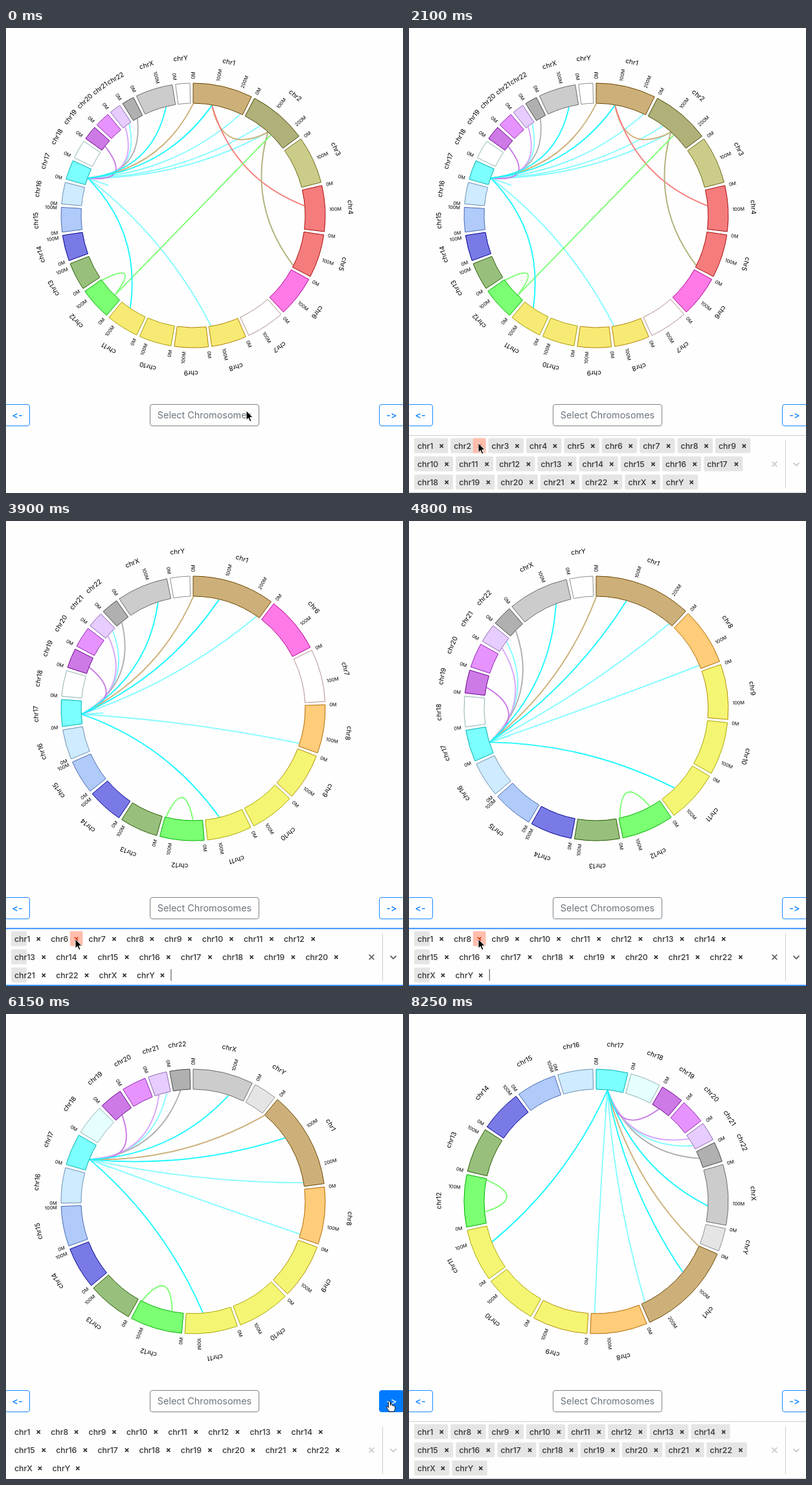
Animation of 613x717 px, one loop 8.7 s. Source, as an HTML page:

```html
<!DOCTYPE html>
<html lang="en">
<head>
<meta charset="utf-8">
<title>Chromosome ring</title>
<style>
  html, body { margin: 0; width: 100%; height: 100%; overflow: hidden; background: #fefefe; }
  svg {
    display: block; width: 613px; height: 717px;
    font-family: Inter, sans-serif;
    font-variant-ligatures: none; font-feature-settings: "calt" 0, "liga" 0;
  }
</style>
</head>
<body>
<svg id="stage" viewBox="0 0 613 717" width="613" height="717"></svg>
<script>
const LOOP = 8700, STEP = 150;
const CX = 289, CY = 289, OUTER = 204, INNER = 173, CHORD = 172.3, GAP = 0.025, BEND = 0.62;

// name: length in Mb, base colour, fill
const CHR = {
  1: [249.25, '996600', 'cdb079'], 2: [243.2, '666600', 'b0b079'],
  3: [198.02, '99991e', 'cccc8a'], 4: [191.15, 'ee1111', 'f57c7c'],
  5: [180.92, 'ee1111', 'f57c7c'], 6: [171.12, 'ff00cc', 'ff7ae6'],
  7: [159.14, 'ffcccc', 'ffffff'], 8: [146.36, 'ff9900', 'ffcc7a'],
  9: [141.21, 'ffcc00', 'f5f574'], 10: [135.53, 'f0f000', 'f5f574'],
  11: [135.01, 'f0f000', 'f5f574'], 12: [133.85, '00ff00', '7bff73'],
  13: [115.17, '358000', '98c07c'], 14: [107.35, '0000cc', '7a7ae6'],
  15: [102.53, '6699ff', 'b0caf9'], 16: [90.35, '99ccff', 'ceebff'],
  17: [81.2, '00ffff', '7bffff'], 18: [78.08, 'ccffff', 'e5ffff'],
  19: [59.13, '9900cc', 'cd7ae6'], 20: [63.03, 'cc33ff', 'e693ff'],
  21: [48.13, 'cc99ff', 'e6ccff'], 22: [51.3, '666666', 'b0b0b0'],
  X: [155.27, '999999', 'cccccc'], Y: [59.37, 'cccccc', 'e5e5e5']
};
const NAMES = [...Array(22).keys()].map(i => String(i + 1)).concat('X', 'Y');

const CYAN = '#1cf9ff', PALE = '#84fcff';
const LINKS = [
  [17, 34, 17, 34, PALE], [17, 34, 1, 238, PALE], [17, 34, 2, 87, PALE],
  [17, 34, 2, 136, PALE], [17, 34, 8, 136, PALE], [17, 34, 21, 36, PALE],
  [17, 34, 22, 22, '#b0b0b0'], [17, 34, 21, 12, '#d6a6fb'], [17, 34, 19, 24, '#c87ae6'],
  [17, 34, 1, 0.5, '#cdb079'], [1, 92, 2, 136, '#cdb079'], [1, 92, 4, 77, '#f57c7c'],
  [2, 136, 5, 171, '#b0b079'], [2, 156, 12, 34, '#7bff73'], [12, 34, 12, 130, '#7bff73'],
  [17, 34, 1, 92, CYAN], [17, 34, 'X', 108, CYAN], [17, 34, 11, 85, CYAN]
];

const REMOVALS = [2550, 2850, 3450, 3900, 4350, 4650];
const TURNS = [6000, 6150, 6450, 6750, 6900, 7050, 7350, 7650];
const OPEN = 1200, FOCUS = 2400, BLUR = 5850, LEAVE = 8100;

const within = (t, a, b) => t >= a && t < b;
const countUntil = (list, t) => list.filter(x => x <= t).length;
const num = v => +v.toFixed(2);
const polar = (a, r) => [CX + r * Math.sin(a), CY - r * Math.cos(a)];
const pt = (a, r) => polar(a, r).map(num).join(' ');
const hexParts = hex => [0, 2, 4].map(i => parseInt(hex.substr(i, 2), 16));
const darker = hex => `rgb(${hexParts(hex).map(v => Math.round(v * 0.7))})`;

function mix(a, b, k) {
  const p = hexParts(a), q = hexParts(b);
  return `rgb(${p.map((v, i) => Math.round(v + (q[i] - v) * k))})`;
}

function rect(x, y, w, h, attrs) {
  return `<rect x="${num(x)}" y="${y}" width="${num(w)}" height="${h}" ${attrs}/>`;
}

function cross(x, y, r, color, width) {
  return `<path d="M${num(x - r)} ${y - r}l${2 * r} ${2 * r}m0 ${-2 * r}l${-2 * r} ${2 * r}"
    stroke="${color}" stroke-width="${width}" fill="none"/>`;
}

// Lighter chromosomes pick up their tint later in the loop.
function look(name, t) {
  let [, base, fill] = CHR[name];
  if (t < 3450 && +name >= 8 && +name <= 11) {
    fill = 'f7ea74';
    base = +name > 9 ? 'f0e000' : 'ffbb00';
  }
  if (t < 6000 && (name === '18' || name === 'Y')) fill = 'ffffff';
  return { fill: '#' + fill, line: darker(base) };
}

function layout(names) {
  const total = names.reduce((s, n) => s + CHR[n][0], 0);
  const scale = (2 * Math.PI - GAP * names.length) / total;
  const start = {};
  let a = 0;
  for (const n of names) {
    start[n] = a;
    a += CHR[n][0] * scale + GAP;
  }
  return { start, at: (n, mb) => start[n] + mb * scale };
}

function block(name, lay, t) {
  const a = lay.start[name], len = CHR[name][0], b = lay.at(name, len);
  const { fill, line } = look(name, t);
  const deg = v => num(v * 180 / Math.PI);
  let out = `<path d="M${pt(a, OUTER)}A${OUTER} ${OUTER} 0 0 1 ${pt(b, OUTER)}L${pt(b, INNER)}` +
    `A${INNER} ${INNER} 0 0 0 ${pt(a, INNER)}Z" fill="${fill}" stroke="${line}"/>`;
  const mid = (a + b) / 2, [lx, ly] = polar(mid, 239.5);
  out += `<text transform="translate(${num(lx)} ${num(ly)}) rotate(${deg(mid)})" ` +
    `font-size="10.2" text-anchor="middle" fill="#000">chr${name}</text>`;
  for (let mb = 0; mb < len; mb += 100) {
    const ang = lay.at(name, mb), flip = ang > Math.PI;
    const [x, y] = polar(ang, 210.5);
    out += `<text transform="translate(${num(x)} ${num(y)}) rotate(${deg(ang) + (flip ? 90 : -90)})" ` +
      `y="2.6" font-size="7.3" text-anchor="${flip ? 'end' : 'start'}" fill="#000">${mb}M</text>`;
  }
  return out;
}

function link([n1, m1, n2, m2, color], lay) {
  const [x1, y1] = polar(lay.at(n1, m1), CHORD), [x2, y2] = polar(lay.at(n2, m2), CHORD);
  const pull = (p, q, c) => num(c + ((p + q) / 2 - c) * BEND);
  return `<path d="M${num(x1)} ${num(y1)}Q${pull(x1, x2, CX)} ${pull(y1, y2, CY)} ${num(x2)} ${num(y2)}" ` +
    `fill="none" stroke="${color}" stroke-width="1.9"/>`;
}

function ring(names, t) {
  const turn = countUntil(TURNS, t), cut = names.length - turn;
  const lay = layout(names.slice(cut).concat(names.slice(0, cut)));
  const shown = LINKS.filter(l => names.includes(String(l[0])) && names.includes(String(l[2])));
  return shown.map(l => link(l, lay)).join('') + names.map(n => block(n, lay, t)).join('');
}

function button(x, w, label, color, fill, weight) {
  const bg = mix('fefefe', color, fill), fg = mix(color, 'ffffff', fill);
  return rect(x, 580.5, w, 33, `rx="3.5" fill="${bg}" stroke="#${color}" stroke-width="0.9"`) +
    `<text x="${x + w / 2}" y="602.2" font-size="14.4" font-weight="${weight}" ` +
    `text-anchor="middle" fill="${fg}">${label}</text>`;
}

function tagWidth(name) {
  if (name === 'X' || name === 'Y') return 58.4;
  return [...name].reduce((w, d) => w + (d === '1' ? 5.8 : 8), 50.4);
}

function panel(names, t) {
  const focus = within(t, FOCUS, BLUR);
  const hot = within(t, 2100, 5100);
  let out = '', x = 8, y = 644;
  if (!within(t, BLUR, LEAVE)) {
    const style = focus ? 'stroke="#2684ff" stroke-width="1.8"' : 'stroke="#ccc"';
    out += `<path d="M0 628.3H613M0 716.2H613" ${style}/>`;
  }
  names.forEach((n, i) => {
    const w = tagWidth(n) - 4;
    if (x + w > 545) { x = 8; y += 28; }
    const shade = t < 2850 || t >= LEAVE ? w : t < BLUR && x === 8 ? 24 : 0;
    if (shade) out += rect(x, y - 11.5, shade, 23, 'rx="1.8" fill="#e5e5e5"');
    const lit = hot && i === 1;
    if (lit) out += rect(x + w - 19.8, y - 11.5, 19.8, 23, 'rx="1.8" fill="#ffbdad"');
    out += `<text x="${num(x + 5)}" y="${y + 4.5}" font-size="12.3" font-weight="500" fill="#333">chr${n}</text>` +
      cross(x + w - 10, y + 0.5, 2.6, lit ? '#de350b' : '#333', 1.7);
    x += w + 4;
  });
  if (within(t, 3450, 4050) || within(t, 4800, 5400))
    out += `<path d="M${num(x - 0.5)} ${y - 9}v18" stroke="#444"/>`;
  const ink = focus ? '#666' : '#ccc';
  return out + cross(564.5, 672.5, 3.8, ink, 1.8) +
    `<path d="M581.5 636V709" stroke="#ccc"/>` +
    `<path d="M593.5 670.5l4.5 4.5 4.5-4.5" fill="none" stroke="${ink}" stroke-width="1.8"/>`;
}

// time, x, y of the pointer tip
const TRAIL = [
  [0, 371, 590], [1200, 371, 590], [1500, 300, 612], [1800, 165, 640], [2100, 107, 640],
  [2400, 107, 640], [2550, 107, 644.5], [4950, 107, 644.5], [5250, 190, 640], [5550, 430, 618],
  [5850, 592, 597], [7950, 592, 597], [8100, 604, 632]
];

function pointer(t) {
  if (t > 8100) return '';
  const i = Math.max(1, TRAIL.findIndex(k => k[0] >= t));
  const [t0, x0, y0] = TRAIL[i - 1], [t1, x1, y1] = TRAIL[i];
  const k = (t - t0) / (t1 - t0);
  const x = num(x0 + (x1 - x0) * k), y = num(y0 + (y1 - y0) * k);
  const hand = within(t, 300, 1350) || within(t, BLUR, LEAVE);
  const d = hand
    ? 'M-1.6 2C-1.6-.4 1.5-.4 1.5 2V6.5C2-.2 4 5.4 4.2 7C4.6 5.6 6.4 5.9 6.6 7.6C7.2 6.6 8.8 7 8.8 8.8V11.5C8.8 13 7.6 14 7.6 16H-.6C-.8 14-3.8 11.6-4.4 9.6C-4.8 8-3 7.8-1.6 9.8Z'
    : 'M0 0V14.6L3.3 11.5L5.7 17L8 16L5.7 10.6H10.2Z';
  const fill = hand ? '#fff' : '#000', line = hand ? '#000' : '#fff';
  return `<path transform="translate(${x} ${y})" d="${d}" fill="${fill}" stroke="${line}" ` +
    `stroke-width="1" stroke-linejoin="round"/>`;
}

function scene(t) {
  const names = NAMES.slice();
  names.splice(1, countUntil(REMOVALS, t));
  const over = within(t, 300, 1500) ? (t === 300 || t === 1350 ? 0.5 : 1) : 0;
  const next = t === 8100 ? 0.4 : within(t, BLUR, LEAVE) ? 1 : 0;
  return ring(names, t) +
    button(-1.5, 38, '&lt;-', '007bff', 0, 500) +
    button(222.5, 168, 'Select Chromosomes', '6c757d', over, 400) +
    button(576.5, 38, '-&gt;', '007bff', next, 500) +
    (t >= OPEN ? panel(names, t) : '') + pointer(t);
}

const stage = document.getElementById('stage');
let last = -1;
function draw(now) {
  const t = Math.floor(now % LOOP / STEP) * STEP;
  if (t !== last) {
    stage.innerHTML = scene(t);
    last = t;
  }
  requestAnimationFrame(draw);
}
draw(performance.now());
</script>
</body>
</html>
```
